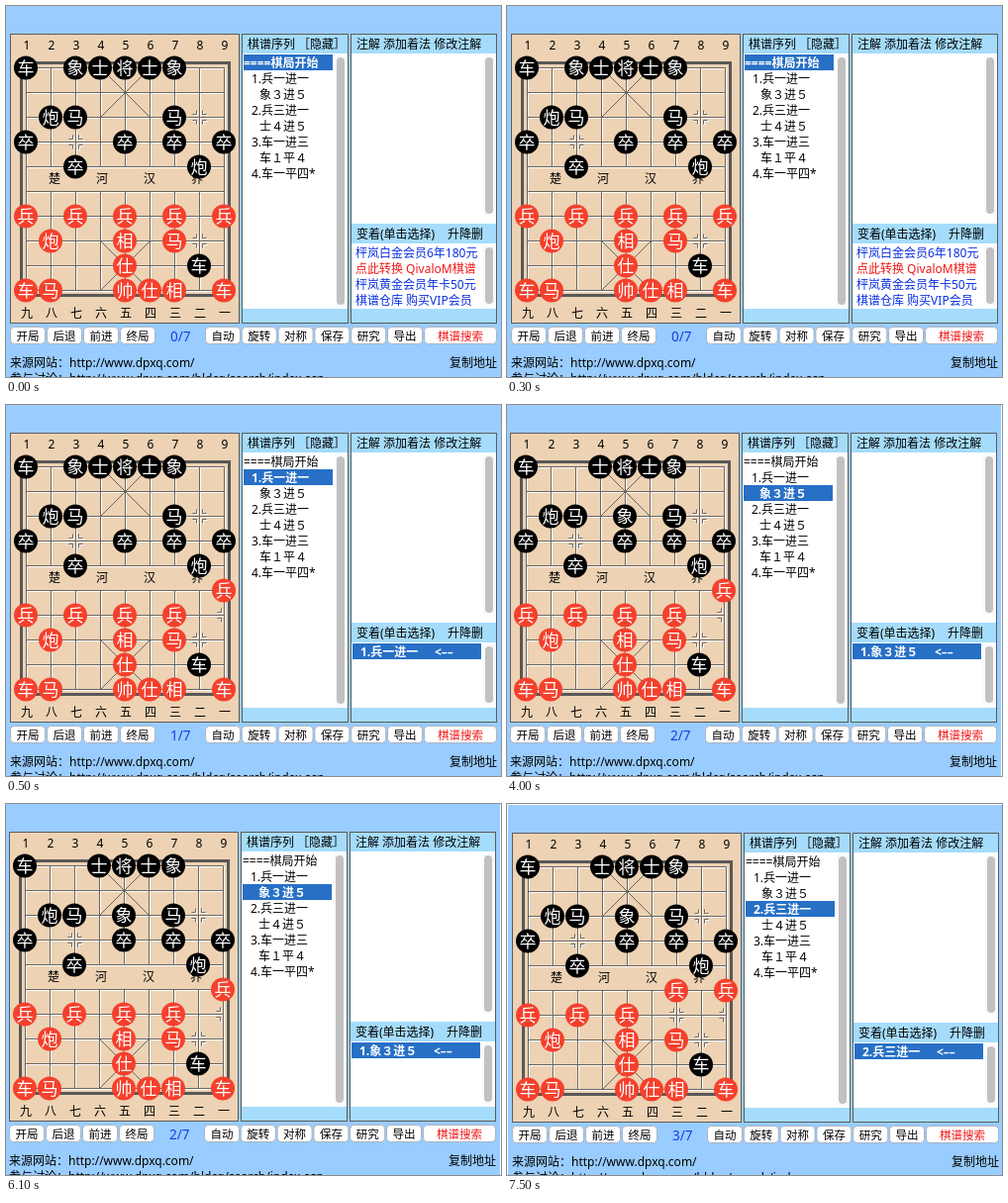
An HTML page with a canvas that plays this animation: 500x375 px, repeating every 8000 ms.

```html
<!DOCTYPE html>
<html lang="zh-CN">
<head>
<meta charset="utf-8">
<title>棋谱演示</title>
<style>
  html, body { margin: 0; width: 100%; height: 100%; overflow: hidden; background: #fff; }
  canvas { display: block; }
</style>
</head>
<body>
<canvas id="stage" width="500" height="375"></canvas>
<script>
const ctx = document.getElementById('stage').getContext('2d');
const LOOP = 8000;
const FONT = '"Noto Sans", "Noto Sans CJK SC", "Noto Sans CJK", sans-serif';
const SKY = '#99ccff', HEAD = '#a5dcfb', EDGE = '#5c5c5c', BAR = '#2770c6';
const RED = '#f5402c', LINK = '#0a2fe0', WARN = '#f01818';

// start time of each position, and a small shift of the whole page
const steps = [
  { at: 0, dx: 0, dy: 0 },
  { at: 500, dx: 0, dy: 0 },
  { at: 4000, dx: -1, dy: 0 },
  { at: 7500, dx: 1, dy: 1 }
];

// moves: [from column, from row, to column, to row]
const moves = [[8, 6, 8, 5], [2, 0, 4, 2], [6, 6, 6, 5]];
const record = ['====棋局开始', '1.兵一进一', '象３进５', '2.兵三进一',
  '士４进５', '3.车一进三', '车１平４', '4.车一平四*'];
const ads = [
  ['枰岚白金会员6年180元', LINK],
  ['点此转换 QivaloM棋谱', WARN],
  ['枰岚黄金会员年卡50元', LINK],
  ['棋谱仓库 购买VIP会员', LINK]
];

// one string per row, a dot for an empty point
const blackRows = ['车.象士将士象..', '', '.炮马...马..', '卒...卒.卒.卒', '..卒....炮.',
  '', '', '', '.......车.', ''];
const redRows = ['', '', '', '', '', '', '兵.兵.兵.兵.兵', '.炮..相.马..', '....仕....',
  '车马..帅仕相.车'];

function setup(rows, color) {
  return rows.flatMap((row, r) => [...row]
    .map((name, c) => ({ name, c, r, color }))
    .filter(p => p.name !== '.'));
}
const pieces = [...setup(blackRows, '#000'), ...setup(redRows, RED)];

function position(count) {
  const now = pieces.map(p => ({ ...p }));
  for (const [c, r, toC, toR] of moves.slice(0, count)) {
    Object.assign(now.find(p => p.c === c && p.r === r), { c: toC, r: toR });
  }
  return now;
}

// y is the middle of the line of text
function text(str, x, y, { size = 12, color = '#000', weight = 400, align = 'left' } = {}) {
  ctx.font = `${weight} ${size}px ${FONT}`;
  ctx.fillStyle = color;
  ctx.textAlign = align;
  ctx.fillText(str, x, y + size * 0.37);
}

function box(x, y, w, h, color) {
  ctx.fillStyle = color;
  ctx.fillRect(x, y, w, h);
}

function pill(x, y, w, h, r, fill, stroke) {
  ctx.beginPath();
  ctx.roundRect(x, y, w, h, r);
  ctx.fillStyle = fill;
  ctx.fill();
  if (stroke) {
    ctx.strokeStyle = stroke;
    ctx.lineWidth = 1;
    ctx.stroke();
  }
}

function panel(x, w, fill) {
  box(x, 28, w, 293, EDGE);
  box(x + 1, 29, w - 2, 291, fill);
}

// white panel with a blue strip above and below
function listPanel(x, w) {
  panel(x, w, HEAD);
  box(x + 1, 48, w - 2, 258, '#fff');
}

function scrollbar(x, y, h) {
  box(x - 2, y - 2, 12, h + 4, '#fafafa');
  pill(x, y, 8, h, 4, '#c1c1c1');
}

const gx = c => 20.5 + 25 * c;
const gy = r => 62.5 + 25 * r;

function addLine(path, c1, r1, c2, r2) {
  path.moveTo(gx(c1), gy(r1));
  path.lineTo(gx(c2), gy(r2));
}

function addMark(path, c, r) {
  for (const sx of [-1, 1]) {
    if (c + sx < 0 || c + sx > 8) continue;
    for (const sy of [-1, 1]) {
      const x = gx(c) + 3 * sx, y = gy(r) + 3 * sy;
      path.moveTo(x + 4 * sx, y);
      path.lineTo(x, y);
      path.lineTo(x, y + 4 * sy);
    }
  }
}

function gridPath() {
  const path = new Path2D();
  for (let r = 0; r < 10; r++) addLine(path, 0, r, 8, r);
  for (let c = 0; c < 9; c++) {
    if (c % 8 === 0) addLine(path, c, 0, c, 9);
    else {
      addLine(path, c, 0, c, 4);
      addLine(path, c, 5, c, 9);
    }
  }
  for (const r of [3, 6]) for (let c = 0; c < 9; c += 2) addMark(path, c, r);
  for (const r of [2, 7]) for (const c of [1, 7]) addMark(path, c, r);
  return path;
}

function palacePath() {
  const path = new Path2D();
  for (const r of [0, 7]) {
    addLine(path, 3, r, 5, r + 2);
    addLine(path, 5, r, 3, r + 2);
  }
  return path;
}
const grid = gridPath(), palaces = palacePath();

function drawGrid() {
  ctx.strokeStyle = '#585858';
  ctx.lineWidth = 3;
  ctx.strokeRect(15.5, 57.5, 210, 235);

  // engraved look: a light edge below and right of each line
  ctx.lineWidth = 1;
  ctx.save();
  ctx.translate(1, 1);
  ctx.strokeStyle = '#fff';
  ctx.stroke(grid);
  ctx.restore();
  ctx.strokeStyle = '#6a655f';
  ctx.stroke(grid);
  ctx.stroke(palaces);
}

function drawBoard(count) {
  panel(4, 232, '#edd2b4');
  drawGrid();
  [...'楚河汉界'].forEach((s, i) => text(s, 49 + 48 * i, 175, { align: 'center' }));
  [...'九八七六五四三二一'].forEach((s, i) => {
    text(String(i + 1), 21 + 25 * i, 40, { align: 'center' });
    text(s, 21 + 25 * i, 310.5, { align: 'center' });
  });
  for (const p of position(count)) {
    const x = 20 + 25 * p.c, y = 62.5 + 25 * p.r;
    ctx.beginPath();
    ctx.arc(x, y, 12, 0, 2 * Math.PI);
    ctx.fillStyle = p.color;
    ctx.fill();
    text(p.name, x, y, { size: 17, color: '#fff', weight: 300, align: 'center' });
  }
}

function drawRecord(count) {
  listPanel(238, 108);
  text('棋谱序列 ［隐藏］', 244, 39);
  scrollbar(334, 52, 250);
  box(240, 49 + 16 * count, 90, 16, BAR);
  record.forEach((s, i) => {
    const x = i === 0 ? 240 : i % 2 ? 248 : 256;
    const style = i === count ? { weight: 700, color: '#fff' } : {};
    text(s, x, 57.5 + 16 * i, style);
  });
}

function drawNotes(count) {
  listPanel(348, 148);
  text('注解 添加着法 修改注解', 354, 39);
  scrollbar(484, 52, 158);
  box(349, 220, 146, 20, HEAD);
  text('变着(单击选择)', 354, 230.5);
  text('升降删', 446, 230.5);
  scrollbar(484, 244, 57);
  if (count === 0) {
    ads.forEach(([s, color], i) => text(s, 353, 249.5 + 16 * i, { color }));
    return;
  }
  box(350, 241, 130, 16, BAR);
  const style = { weight: 700, color: '#fff' };
  const move = record[count];
  text(/^\d/.test(move) ? move : '1.' + move, 358, 249.5, style);
  text('<––', 433, 249.5, style);
}

function button(label, x, w, color = '#000') {
  pill(x + 0.5, 324.5, w - 1, 17, 4, '#fff', '#a9b4c0');
  text(label, x + w / 2, 333.5, { size: 11.5, color, align: 'center' });
}

function drawFooter(count) {
  ['开局', '后退', '前进', '终局'].forEach((s, i) => button(s, 4 + 37 * i, 36));
  ['自动', '旋转', '对称', '保存', '研究', '导出'].forEach((s, i) => button(s, 201 + 36.8 * i, 36));
  button('棋谱搜索', 422, 74, WARN);
  text(`${count}/7`, 166, 334.5, { size: 13.5, color: '#1440e8' });
  text('来源网站：', 4, 361);
  text('http://www.dpxq.com/', 64, 361);
  text('复制地址', 448, 361);
  text('参与讨论：', 4, 376.5);
  text('http://www.dpxq.com/hldcg/search/index.asp', 64, 376.5);
}

function draw(ms) {
  const count = steps.findLastIndex(s => ms >= s.at);
  const { dx, dy } = steps[count];
  ctx.setTransform(1, 0, 0, 1, 0, 0);
  box(0, 0, 500, 375, '#fff');
  ctx.translate(dx, dy);
  box(0, 0, 500, 375, SKY);
  drawBoard(count);
  drawRecord(count);
  drawNotes(count);
  drawFooter(count);
}

const start = performance.now();
function tick() {
  draw((performance.now() - start) % LOOP);
  requestAnimationFrame(tick);
}
tick();
</script>
</body>
</html>
```
